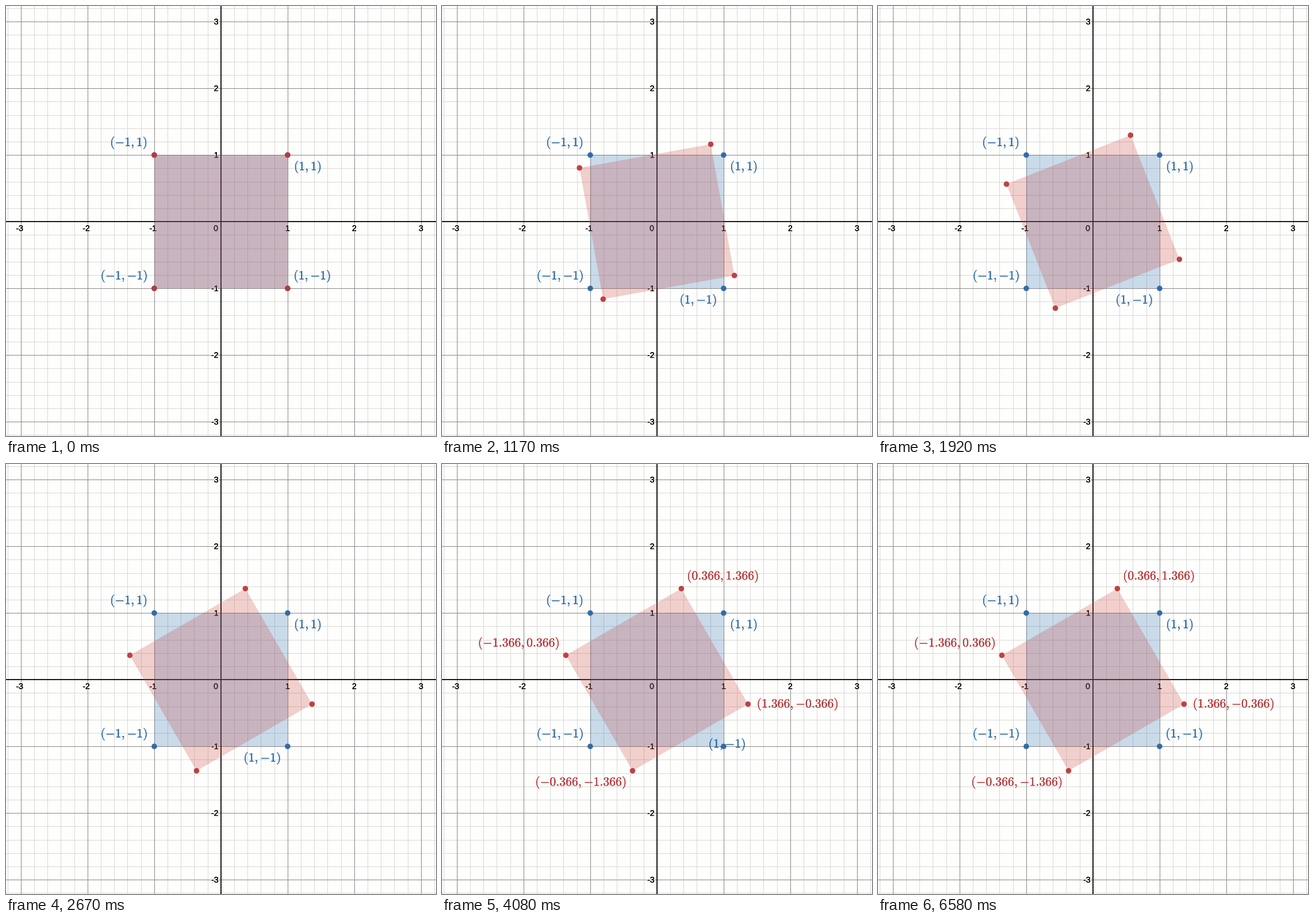
Animation of 748 by 748 pixels, one loop 6660 ms. Source, as a matplotlib script:

```python
import numpy as np
import matplotlib.pyplot as plt
from matplotlib.animation import FuncAnimation
from matplotlib.patches import Circle, Polygon
from matplotlib.patheffects import Normal, Stroke

SIZE, DPI = 748, 100
LOOP_MS, FRAMES = 6660, 80
PX = 72 / DPI                      # points per pixel
CX, CY, UNIT = 373.9, 375.2, 116   # origin and scale in pixels

PAPER = "#fefefc"
BLUE, RED = "#2d70b3", "#c74440"
BLUE_INK, RED_INK = "#2d6ca6", "#b93a3c"
CORNERS = np.array([(1, 1), (-1, 1), (-1, -1), (1, -1)])

plt.rcParams["mathtext.fontset"] = "cm"
plt.rcParams["font.family"] = "Liberation Sans"

fig = plt.figure(figsize=(SIZE / DPI, SIZE / DPI), dpi=DPI, facecolor=PAPER)
ax = fig.add_axes([0, 0, 1, 1])
ax.set_xlim(0, SIZE)
ax.set_ylim(SIZE, 0)
ax.axis("off")


def to_px(points):
    """Convert plane coordinates to stage pixels."""
    return np.asarray(points) * (UNIT, -UNIT) + (CX, CY)


def rotated(degrees):
    a = np.radians(degrees)
    c, s = np.cos(a), np.sin(a)
    return to_px(CORNERS @ np.array([[c, s], [-s, c]]))


def ramp(n, start, end):
    return float(np.clip((n - start) / (end - start), 0, 1))


def stroke(width, color):
    return Stroke(linewidth=width * PX, foreground=color)


def grid_line(step, color, width, z):
    x, y = CX + step * UNIT, CY + step * UNIT
    style = dict(color=color, lw=width * PX, zorder=z)
    ax.plot([x, x], [0, SIZE], **style)
    ax.plot([0, SIZE], [y, y], **style)


def tick_label(x, y, text, ha):
    ax.text(x, y, text, size=14 * PX, color="black", ha=ha,
            va="center_baseline", zorder=3,
            path_effects=[stroke(3, PAPER), stroke(0.35, "black"), Normal()])


def coord_label(x, y, a, b, color):
    text = f"$({a},{b})$".replace("-", "{-}")
    return ax.text(x, y, text, size=21.7 * PX, color=color,
                   ha="center", va="center", zorder=8,
                   path_effects=[stroke(0.3, color), Normal()])


def fill(points, color, z):
    shape = Polygon(points, closed=True, fc=color, ec="none", alpha=0.25, zorder=z)
    return ax.add_patch(shape)


def dot(center, color, z):
    return ax.add_patch(Circle(center, 4.8, fc=color, ec="none", alpha=0.95, zorder=z))


# Grid and axes
for i in range(-16, 17):
    if i % 5:
        grid_line(i / 5, "#d8d8d8", 1, 0)
for i in range(-3, 4):
    if i:
        grid_line(i, "#888889", 1, 1)
grid_line(0, "black", 1.8, 2)

for i in range(-3, 4):
    if i:
        shift = 2.3 if i < 0 else 0
        tick_label(CX + i * UNIT - shift, 385.8, str(i), "center")
        tick_label(369.5, CY - i * UNIT - 0.7, str(i), "right")
tick_label(365, 385.8, "0", "center")

# Fixed square and turning square
base = rotated(0)
fill(base, BLUE, 4)
turned = fill(base, RED, 5)

for p in base:
    dot(p, "#2a66a6", 6)
red_dots = [dot(p, "#bd383a", 7) for p in base]

coord_label(525, 280, 1, 1, BLUE_INK)
coord_label(213.5, 238, -1, 1, BLUE_INK)
coord_label(205.5, 470, -1, -1, BLUE_INK)
HOME, ASIDE = np.array([532.8, 470]), np.array([445.8, 512])
moving = coord_label(*HOME, 1, -1, BLUE_INK)

red_labels = [
    coord_label(488.6, 195.5, "0.366", "1.366", RED_INK),
    coord_label(133.6, 312, "-1.366", "0.366", RED_INK),
    coord_label(241.6, 554, "-0.366", "-1.366", RED_INK),
    coord_label(618.6, 418, "1.366", "-0.366", RED_INK),
]


def update(n):
    points = rotated(30 * ramp(n, 5.87, 29.76))
    turned.set_xy(points)
    for d, p in zip(red_dots, points):
        d.center = p

    # The corner label steps aside for the turn, then returns
    away = ramp(n, 0, 5.87) - ramp(n, 45.6, 51.5)
    moving.set_position(HOME + (ASIDE - HOME) * away)

    for label in red_labels:
        label.set_alpha(ramp(n, 35, 41))
    return []


anim = FuncAnimation(fig, update, frames=FRAMES, interval=LOOP_MS / FRAMES,
                     repeat=True, repeat_delay=0)
plt.show()
```
